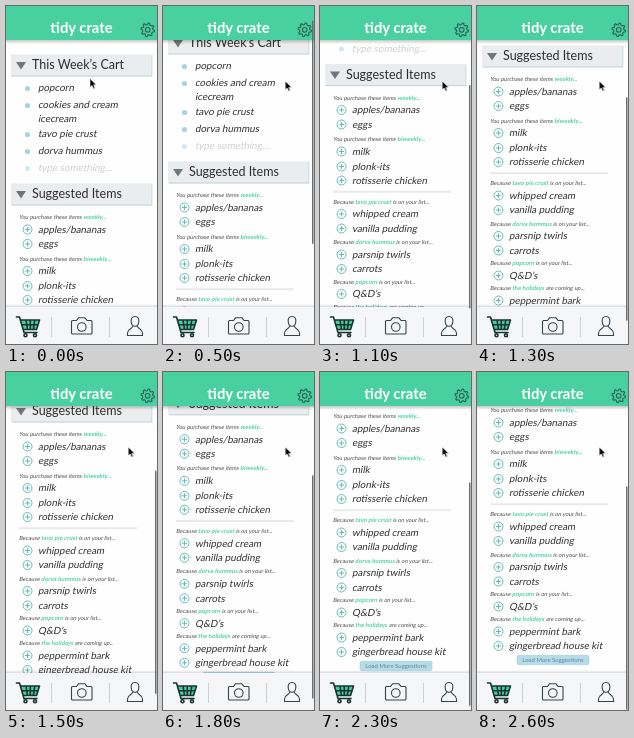
Write an HTML page that moves like this. It is 151 by 338 pixels and loops after 2.7 s.

```html
<!DOCTYPE html>
<html lang="en">
<head>
<meta charset="utf-8">
<title>Shopping list</title>
<style>
@property --s { syntax: '<number>'; inherits: true; initial-value: 0; }
html, body { margin: 0; width: 100%; height: 100%; overflow: hidden; background: #fefefe; }
svg { display: block; width: 100%; height: 100%; font-family: Lato, sans-serif; animation: scroll 2.7s infinite; }
#list { transform: translateY(calc(var(--s) * -1px)); }
#thumb { transform: translateY(calc(var(--s) * .661px)); animation: show 2.7s step-end infinite; }
#cursor { animation: point 2.7s infinite; }

.head { font-size: 12.5px; fill: #2c2c2e; }
.item { font-size: 9.85px; fill: #303032; }
.hint { fill: #cdd0d2; }
.note { font-size: 5.65px; fill: #4a4a4c; }
.note tspan { font-size: 6px; font-weight: 700; fill: #4fd0a8; }
.line { fill: none; stroke: #36434a; stroke-width: 1.1; stroke-linejoin: round; stroke-linecap: round; }
.plus { fill: none; stroke: #55b8ae; stroke-width: .9; }

/* one step per 100 ms */
@keyframes scroll {
  0%, 7.4% { --s: 0; animation-timing-function: step-end; }
  11.11% { --s: 3; animation-timing-function: step-end; }
  14.81% { --s: 10; animation-timing-function: step-end; }
  18.51% { --s: 22; animation-timing-function: steps(3); }
  29.62% { --s: 74; animation-timing-function: steps(3); }
  40.74% { --s: 119.5; animation-timing-function: step-end; }
  44.44% { --s: 130; animation-timing-function: step-end; }
  48.14% { --s: 138; animation-timing-function: steps(2); }
  55.55% { --s: 149; animation-timing-function: steps(5); }
  74.07% { --s: 161; animation-timing-function: steps(6); }
  96.29%, 100% { --s: 173; }
}
@keyframes show {
  0% { opacity: 0; }
  11.11%, 100% { opacity: 1; }
}
@keyframes point {
  0% { transform: translate(84px, 72.5px); animation-timing-function: steps(3); }
  11.11%, 100% { transform: translate(122.3px, 75px); }
}
</style>
</head>
<body>
<svg viewBox="0 0 151 338" preserveAspectRatio="none">
  <defs>
    <linearGradient id="down" x2="0" y2="1">
      <stop stop-color="#000" stop-opacity=".22"/>
      <stop offset="1" stop-color="#000" stop-opacity="0"/>
    </linearGradient>
    <linearGradient id="up" x2="0" y2="1">
      <stop stop-color="#000" stop-opacity="0"/>
      <stop offset="1" stop-color="#000" stop-opacity=".14"/>
    </linearGradient>
  </defs>

  <g id="list"></g>

  <rect width="151" height="34" fill="#49d0a1"/>
  <rect y="34" width="151" height="4" fill="url(#down)"/>
  <text x="75.5" y="27.3" text-anchor="middle" font-size="14.8" font-weight="700" fill="#fff">tidy crate</text>
  <g id="gear" class="line" transform="translate(141.7 23.8)" style="stroke:#2c5f55"><circle r="2.3"/></g>

  <rect y="298" width="151" height="3" fill="url(#up)"/>
  <rect y="301" width="151" height="37" fill="#f4f6f7"/>
  <path d="M45.5 311V331M103.5 311V331" stroke="#c3c8ca" stroke-width=".8"/>
  <path d="M14.5 314H33.5L30.5 323.5H17.5Z" fill="#45cfa1"/>
  <g class="line">
    <g stroke="#17332d" stroke-width="1.6">
      <path d="M10.5 311H13.5L18 326.5H31M14.5 314H33.5L30.5 323.5H17.5M20 314L21.5 323.5M24.3 314V323.5M28.8 314L27.3 323.5M15.8 318.7H32"/>
      <circle cx="19.5" cy="329.3" r="1.5"/>
      <circle cx="29" cy="329.3" r="1.5"/>
    </g>
    <path d="M66.5 314.5H70.5L72.5 311.8H79L81 314.5H85Q86 314.5 86 315.5V327Q86 328 85 328H66.5Q65.5 328 65.5 327V315.5Q65.5 314.5 66.5 314.5Z"/>
    <circle cx="75.8" cy="321" r="4.3"/>
    <path d="M129 310.5C125.8 310.5 125 313 125.2 315.5C125.4 318.2 127 320.3 129 320.3S132.6 318.2 132.8 315.5C133 313 132.2 310.5 129 310.5ZM126.8 320C126.5 323 121.5 322.5 121.5 327V329.5H136.5V327C136.5 322.5 131.5 323 131.2 320"/>
  </g>

  <rect id="thumb" x="149" width="1.5" height="223.5" rx=".7" fill="#686d6e"/>
  <path id="cursor" d="M0 0V8.8L2 7L3.5 10.2L5 9.5L3.6 6.4H6.3Z" fill="#000" stroke="#fff" stroke-width=".6"/>
</svg>

<script>
const list = document.getElementById('list');
let out = '';

const text = (cls, x, y, s, slant = -11) => {
  out += `<text class="${cls}" transform="translate(${x} ${y}) skewX(${slant})">${s}</text>`;
};

function head(y, s) {
  out += `<rect x="5.5" y="${y - 10}" width="140.8" height="21.6" fill="#c3d5dd"/>
    <rect x="5" y="${y - 10.5}" width="140.5" height="21" fill="#ebecee"/>
    <path d="M10 ${y - 3}H20L15 ${y + 4.5}Z" fill="#70777a"/>`;
  text('head', 26, y + 4.3, s, 0);
}

function dot(y, s, cls = '') {
  out += `<circle cx="21.5" cy="${y + .5}" r="2.6" fill="#a9d3e3" opacity="${cls ? .5 : 1}"/>`;
  text('item ' + cls, 32, y + 3.4, s);
}

function plus(y, s) {
  out += `<path class="plus" d="M17 ${y}a4.5 4.5 0 1 0 9 0a4.5 4.5 0 1 0 -9 0M19 ${y}h5M21.5 ${y - 2.5}v5"/>`;
  text('item', 32, y + 3.4, s);
}

const note = (y, a, b, c = '') => text('note', 13, y + 2, `${a} <tspan>${b}</tspan>${c}`);

head(59, 'This Week’s Cart');
dot(82, 'popcorn');
dot(99, 'cookies and cream');
text('item', 32, 116.4, 'icecream');
dot(128, 'tavo pie crust');
dot(145, 'dorva hummus');
dot(162, 'type something…', 'hint');

head(188, 'Suggested Items');
note(211, 'You purchase these items', 'weekly...');
plus(223.5, 'apples/bananas');
plus(238, 'eggs');
note(252.5, 'You purchase these items', 'biweekly...');
plus(265, 'milk');
plus(280, 'plonk-its');
plus(294, 'rotisserie chicken');
out += '<rect x="13" y="304.2" width="118" height="2" fill="#e8ebec"/>';
note(315, 'Because', 'tavo pie crust', ' is on your list...');
plus(327.5, 'whipped cream');
plus(342, 'vanilla pudding');
note(355.5, 'Because', 'dorva hummus', ' is on your list...');
plus(368, 'parsnip twirls');
plus(382.5, 'carrots');
note(395, 'Because', 'popcorn', ' is on your list...');
plus(407.5, 'Q&amp;D’s');
note(420, 'Because', 'the holidays', ' are coming up...');
plus(432.5, 'peppermint bark');
plus(447, 'gingerbread house kit');
out += `<rect x="40" y="456.3" width="72" height="9.5" rx="2" fill="#b5dce8" stroke="#9cc8d6" stroke-width=".5"/>
  <text x="76" y="463" text-anchor="middle" font-size="6" fill="#5f8795">Load More Suggestions</text>`;
list.innerHTML = out;

// gear rim: eight flat teeth
const rim = [];
for (let i = 0; i < 32; i++) {
  const a = (i + .5) * Math.PI / 16, r = i % 4 < 2 ? 6.8 : 5.1;
  rim.push((r * Math.cos(a)).toFixed(2) + ' ' + (r * Math.sin(a)).toFixed(2));
}
document.getElementById('gear').insertAdjacentHTML('beforeend', `<path d="M${rim.join('L')}Z"/>`);
</script>
</body>
</html>
```
